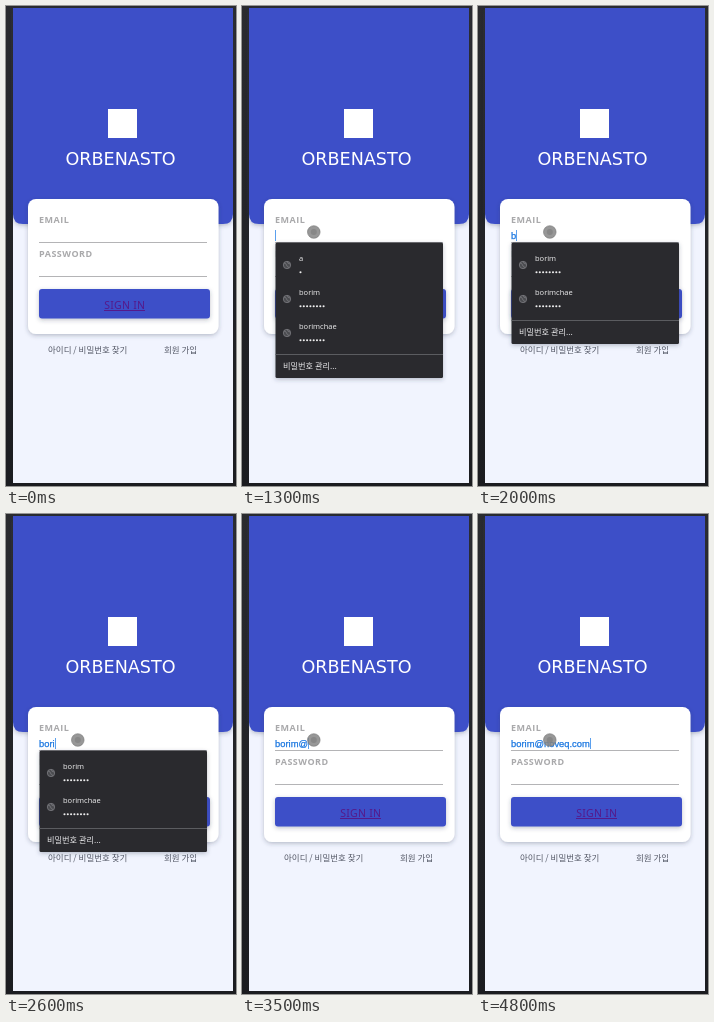
These frames come from a looping animation (230 px wide and 480 px high, 5000 ms). An HTML page:

```html
<!DOCTYPE html>
<html>
<head>
<meta charset="utf-8">
<style>
  html, body { margin: 0; width: 100%; height: 100%; overflow: hidden; background: #202125; }
  svg { display: block; width: 230px; height: 480px; }
  text { white-space: pre; }
  .title { font: 17.6px "DejaVu Sans", sans-serif; fill: #fff; text-anchor: middle; }
  .label { font: 700 9px "Open Sans", sans-serif; letter-spacing: .5px; fill: #a9a9ab; }
  .sign { font: 500 10.5px "Noto Sans", sans-serif; letter-spacing: .25px; fill: #551a8b; text-anchor: middle; }
  .link { font: 8.5px "Noto Sans CJK KR", "Noto Sans CJK", sans-serif; fill: #555967; }
  .typed { font: 9.4px "Liberation Sans", Arial, sans-serif; fill: #1976e0; stroke: #1976e0; stroke-width: .25px; }
  .user { font: 7.5px "Open Sans", sans-serif; fill: #f1f1f2; }
  .manage { font: 8.2px "Noto Sans CJK KR", "Noto Sans CJK", sans-serif; fill: #e8e8ea; }
</style>
</head>
<body>
<svg viewBox="0 0 230 480">
  <defs>
    <linearGradient id="edge" x2="0" y2="1">
      <stop offset="0" stop-color="#2a2b2f"/>
      <stop offset="1" stop-color="#1b1c20"/>
    </linearGradient>
    <filter id="soft" x="-20%" y="-20%" width="140%" height="150%">
      <feDropShadow dx="0" dy="1.5" stdDeviation="2" flood-color="#30364f" flood-opacity=".3"/>
    </filter>
  </defs>

  <rect width="230" height="480" fill="url(#edge)"/>
  <rect x="7" y="2" width="220" height="475" fill="#f1f4fe"/>
  <path d="M7 2H227V208Q227 218 217 218H17Q7 218 7 208Z" fill="#3c50c8" filter="url(#soft)"/>
  <rect x="102" y="103" width="29" height="29" fill="#fff"/>
  <text class="title" x="114.5" y="158.5">ORBENASTO</text>

  <rect x="22" y="193" width="190.500" height="135" rx="8" fill="#fff" filter="url(#soft)"/>
  <text class="label" x="33" y="216.500">EMAIL</text>
  <text class="label" x="33" y="251">PASSWORD</text>
  <path d="M33 236.500H201M33 270.500H201" stroke="#b4b4b6"/>
  <rect x="33" y="283" width="171" height="29.500" rx="3" fill="#3c50c8" filter="url(#soft)"/>
  <text class="sign" x="118.700" y="302.800">SIGN IN</text>
  <path d="M98 304.500H139" stroke="#551a8b"/>
  <text class="link" x="42" y="347.200">아이디 / 비밀번호 찾기</text>
  <text class="link" x="158" y="347.200">회원 가입</text>

  <text class="typed" id="typed" x="33" y="233"></text>
  <path id="caret" d="M0 224V235" stroke="#5ba0ee"/>

  <g id="menu">
    <rect id="panel" x="33.500" y="236.500" width="167.500" rx="1.500" fill="#292a2d" filter="url(#soft)"/>
    <g id="rows"></g>
    <g id="foot">
      <path d="M33.500 .500H201" stroke="#5b5c60"/>
      <text class="manage" x="41" y="15.300">비밀번호 관리...</text>
    </g>
  </g>

  <g id="dot">
    <circle cx="71.800" cy="226" r="6.300" fill="#858585" fill-opacity=".85" stroke="#777" stroke-opacity=".6"/>
    <circle cx="71.800" cy="226" r="3" fill="#777" fill-opacity=".5"/>
  </g>
  <g id="move" transform="translate(71.500 225.500)">
    <path id="halo" fill="#111" stroke="#fff" stroke-width="1.600" paint-order="stroke"
      d="M0-5L2-2.600H.600V-.600H2.600V-2L5 0L2.600 2V.600H.600V2.600H2L0 5L-2 2.600H-.600V.600H-2.600V2L-5 0L-2.600-2V-.600H-.600V-2.600H-2Z"/>
  </g>
</svg>

<script>
const LOOP = 5000, ROW = 34, TOP = 237;
const EMAIL = 'borim@noveq.com';
const users = [['a', 1], ['borim', 8], ['borimchae', 8]];

// Time at which each character of EMAIL appears
const keys = [1800, 2300, 2500, 2600, 2800, 3500, 3800, 4000, 4100, 4200, 4300, 4400, 4500, 4600, 4700];
const caretOn = [[1000, 1700], [1800, 3300], [3500, 5000]];
const menuOn = [[1300, 3500]];
const moveOn = [[3300, 3500]];

const $ = id => document.getElementById(id);
const within = (t, spans) => spans.some(([a, b]) => t >= a && t < b);
const show = (el, on) => el.style.display = on ? '' : 'none';

function userRow([name, length]) {
  let dots = '';
  for (let i = 0; i < length; i++) dots += `<circle cx="${58.5 + i * 3.3}" cy="29.300" r="1.050" fill="#eee"/>`;
  return `<g>
    <g fill="none" stroke="#7b7c80" stroke-width=".8">
      <circle cx="45" cy="22" r="3.700" fill="#4b4c50"/>
      <path d="M42 20Q44 20 44.500 22T47 24.500M45.500 18.500Q45 20.500 48 21"/>
    </g>
    <text class="user" x="57" y="18.300">${name}</text>${dots}</g>`;
}
$('rows').innerHTML = users.map(userRow).join('');
const rows = [...$('rows').children];

function layoutMenu(prefix) {
  let n = 0;
  rows.forEach((row, i) => {
    const match = users[i][0].startsWith(prefix);
    show(row, match);
    if (match) row.setAttribute('transform', `translate(0 ${TOP + ROW * n++})`);
  });
  $('panel').setAttribute('height', 33.5 + ROW * n);
  $('foot').setAttribute('transform', `translate(0 ${TOP + 9 + ROW * n})`);
}

function draw(t) {
  const text = EMAIL.slice(0, keys.filter(k => t >= k).length);
  const typed = $('typed');
  if (typed.textContent !== text) typed.textContent = text;
  const width = text ? typed.getComputedTextLength() : 0;
  $('caret').setAttribute('transform', `translate(${33.5 + Math.round(width)} 0)`);
  show($('caret'), within(t, caretOn));
  show($('menu'), within(t, menuOn));
  layoutMenu(text);

  const moving = within(t, moveOn);
  show($('move'), moving);
  show($('dot'), t >= 700 && !moving);
  $('dot').style.opacity = t < 800 ? .5 : 1;
}

const start = performance.now();
function tick() {
  draw((performance.now() - start) % LOOP);
  requestAnimationFrame(tick);
}
tick();
</script>
</body>
</html>
```
